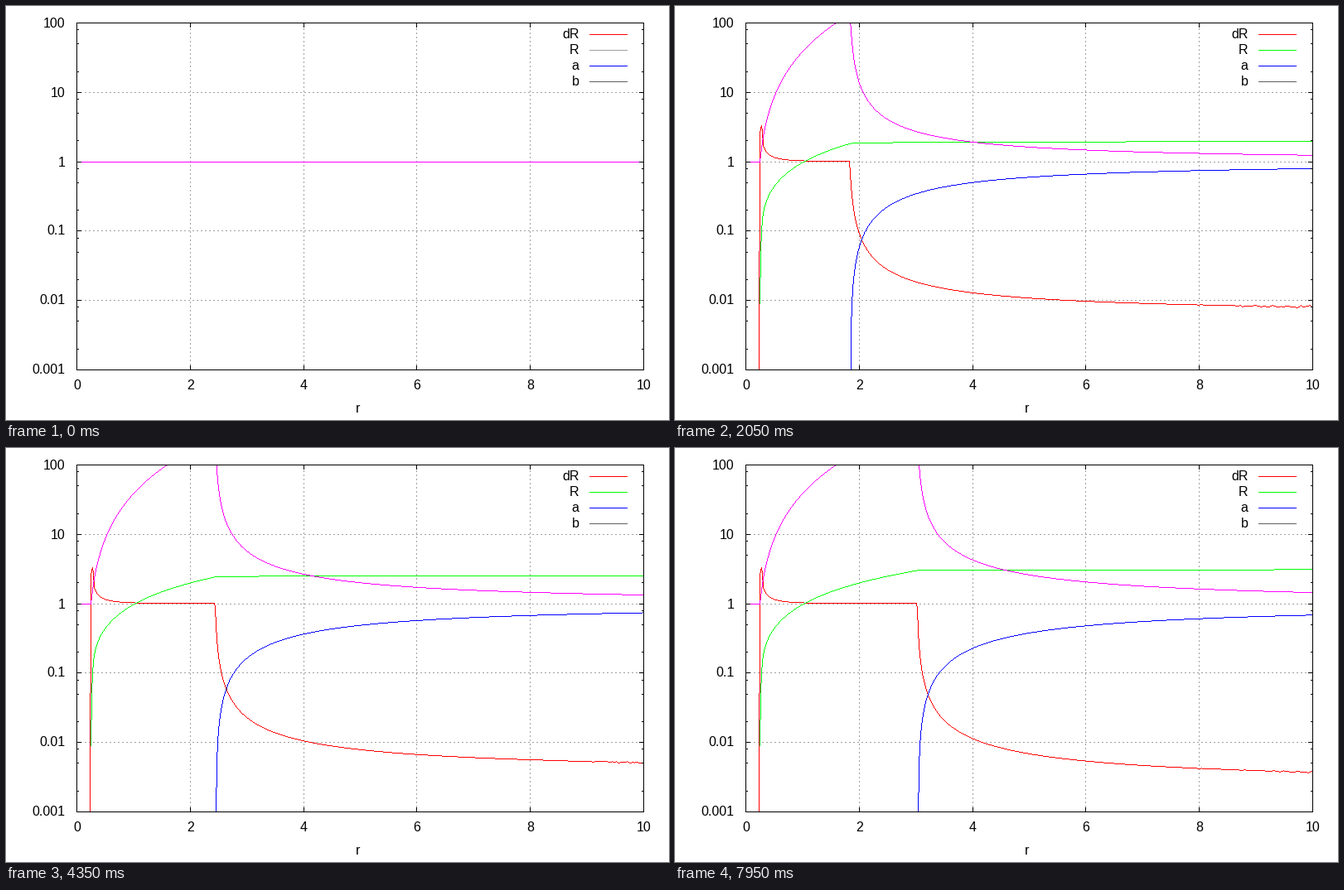
A matplotlib script that plays this animation: 800x500 px, repeating every 8000 ms.

```python
import numpy as np
import matplotlib.pyplot as plt
from matplotlib.animation import FuncAnimation

W, H, DPI = 800, 500, 100
FRAMES, STEP = 160, 50
LEFT, RIGHT, TOP, BOTTOM = 85, 769, 20, 439
PX = 72 / DPI
UNIT = (RIGHT - LEFT) / 10
DECADE = (BOTTOM - TOP) / 5
CORE = 0.25          # radius of the empty core
RED, GREEN, BLUE, MAGENTA = "#ff0000", "#00ff00", "#0000ff", "#ff00ff"
GRAY, DARK = "#a0a0a0", "#606060"

plt.rcParams["font.family"] = "Liberation Sans"
plt.rcParams["path.simplify"] = False
fig = plt.figure(figsize=(W / DPI, H / DPI), dpi=DPI, facecolor="white")
ax = fig.add_axes([0, 0, 1, 1])
ax.set_xlim(0, W)
ax.set_ylim(H, 0)
ax.axis("off")


def px(r):
    return LEFT + np.asarray(r) * UNIT


def py(v):
    return TOP + (2 - np.log10(np.maximum(v, 1e-7))) * DECADE


def stroke(xs, ys, color, z=1, **kw):
    return ax.plot(xs, ys, color=color, lw=PX, zorder=z, snap=False,
                   solid_capstyle="butt", dash_capstyle="butt", **kw)[0]


def hline(y, x0, x1, color="black", z=5, **kw):
    return stroke([x0, x1 + 1], [y + 0.5, y + 0.5], color, z, **kw)


def vline(x, y0, y1, color="black", z=5, **kw):
    return stroke([x + 0.5, x + 0.5], [y0, y1 + 1], color, z, **kw)


def label(x, y, text, ha):
    ax.text(x, y, text, ha=ha, va="baseline", fontsize=16 * PX, color="black")


def tick_y(v, size):
    y = round(float(py(v)))
    hline(y, LEFT, LEFT + size)
    hline(y, RIGHT - size, RIGHT)
    return y


# grid, ticks and tick labels
for k, name in enumerate(["100", "10", "1", "0.1", "0.01", "0.001"]):
    y = tick_y(10.0 ** (2 - k), 5)
    label(71.5, y + 5.5, name, "right")
    if 0 < k < 5:
        hline(y, LEFT, RIGHT, GRAY, 0, dashes=(2, 3))
    if k:
        for m in (2, 5, 8):
            tick_y(m * 10.0 ** (2 - k), 2)

for v in range(0, 11, 2):
    x = round(float(px(v)))
    label(x + 0.5, 463, str(v), "center")
    vline(x, TOP, TOP + 5)
    vline(x, BOTTOM - 5, BOTTOM)
    if 0 < v < 10:
        vline(x, BOTTOM, TOP, GRAY, 0, dashes=(2, 3))

label(425, 491, "r", "center")
for y in (TOP, BOTTOM):
    hline(y, LEFT, RIGHT)
for x in (LEFT, RIGHT):
    vline(x, TOP, BOTTOM)

# legend
keys = []
for k, (name, color) in enumerate([("dR", RED), ("R", GREEN), ("a", BLUE), ("b", DARK)]):
    y = 34 + 19 * k
    label(691.5, y + 5, name, "right")
    keys.append(hline(y, 704, 749, color))

curves = [stroke([], [], color, 2 + k / 10)
          for k, color in enumerate((RED, GREEN, BLUE, MAGENTA))]

full = np.arange(RIGHT - LEFT + 1) / UNIT
r = full[full > 0.3]                      # one sample per pixel column
R_IN = np.sqrt(r ** 2 - CORE ** 2)


def trace(line, x, v):
    """Draw a curve one pixel wide, as one vertical run per column."""
    cols = np.arange(round(float(px(x[0]))), RIGHT + 1)
    y = np.round(np.interp(cols, px(x), py(np.asarray(v, float))))
    lo, hi = y.copy(), y.copy()
    p, q = y[:-1], y[1:]
    split = np.floor((p + q - 1) / 2)
    hi[:-1] = np.where(p < q, split, hi[:-1])
    lo[1:] = np.where(p > q, np.minimum(lo[1:], lo[1:]), lo[1:])
    hi[1:] = np.where(p > q, np.maximum(hi[1:], split), hi[1:])
    lo[:-1] = np.where(p > q, np.minimum(lo[:-1], split + 1), lo[:-1])
    lo[1:] = np.where(p < q, np.minimum(lo[1:], split + 1), lo[1:])
    seen = (hi >= TOP) & (lo <= BOTTOM)
    lo, hi = np.maximum(lo, TOP)[seen], np.minimum(hi, BOTTOM)[seen]
    c = cols[seen] + 0.5
    gap = np.full_like(c, np.nan)
    line.set_data(np.c_[c, c, gap].ravel(), np.c_[lo, hi + 1, gap].ravel())


def soft_min(u, v, n):
    return (u ** -n + v ** -n) ** (-1 / n)


def horizon(t):
    q = 3.69 * t - 1.3
    return (0.5 * (q + np.sqrt(q * q + 0.15))) ** (1 / 3)


def noise(i):
    rng = np.random.default_rng(i)
    level = rng.uniform(0, 0.035)
    coarse = np.arange(0, 10.05, 0.04)
    wave = np.interp(r, coarse, rng.normal(size=coarse.size))
    return 1 + level * np.clip((r - 6) / 4, 0, 1) ** 3 * wave


def fields(t):
    rs = horizon(t)
    p_a = 1 + min(0.45 / rs ** 2.2, 0.3)
    p_b = 1.01 + min(0.2 / rs ** 2, 0.1)
    outer = np.maximum(1 - (rs - 0.015) / r, 1e-9) ** -p_b
    s = min(t / 0.5, 1)
    slope = 0.021 * rs ** -1.857 * s * s * (3 - 2 * s) * (r / 4) ** -0.04
    d = soft_min(r / R_IN, slope * outer, 1.3)
    b = soft_min(1 + 40 * R_IN ** 2, outer, 2.0)
    area = np.cumsum((d[1:] + d[:-1]) / 2 * np.diff(r))
    R = R_IN[0] + 0.003 + np.concatenate([[0], area])
    a = np.maximum(1 - rs / np.maximum(full, 1e-6), 1e-9) ** p_a
    a = np.maximum(a, np.exp(-25 * t))
    return d, R, a, b


def draw(i):
    keys[1].set_color(GREEN if i else GRAY)
    if i == 0:
        for line in curves[:3]:
            line.set_data([], [])
        trace(curves[3], full, np.ones_like(full))
        return curves
    d, R, a, b = fields(i * STEP / 1000)
    trace(curves[0], np.r_[0.234, 0.2485, 0.285, r], np.r_[0.001, 2.6, 3.5, d * noise(i)])
    trace(curves[1], np.r_[0.2485, 0.263, 0.285, r], np.r_[0.009, 0.05, 0.137, R])
    trace(curves[2], full, a)
    trace(curves[3], np.r_[0, 0.25, 0.285, r], np.r_[1, 1, 1.75, b])
    return curves


anim = FuncAnimation(fig, draw, frames=FRAMES, interval=STEP,
                     init_func=lambda: draw(0), repeat=True, repeat_delay=0)
plt.show()
```
